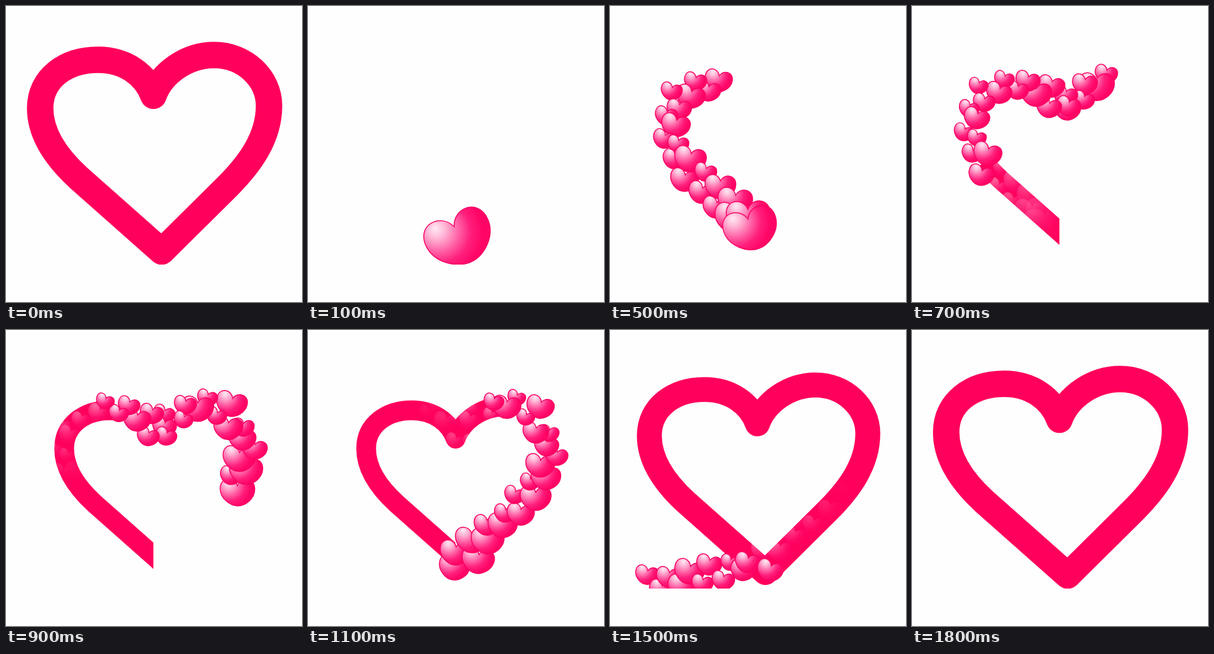
An HTML page with a canvas for the animation above (1.9 s loop, 498 px wide and 498 px high).

```html
<!DOCTYPE html>
<html lang="en">
<head>
<meta charset="utf-8">
<title>Heart trail</title>
<style>
  html, body { margin: 0; width: 100%; height: 100%; overflow: hidden; background: #fdfefd; }
  canvas { display: block; }
</style>
</head>
<body>
<canvas id="stage" width="498" height="498"></canvas>
<script>
const ctx = document.getElementById('stage').getContext('2d');
const LOOP = 1900, STEP = 100, FLOOR = 435;
const BEGIN = 100, END = 1300;          // hearts are emitted in this span
const SOLID = 450, GONE = 650;          // ages at which a heart melts and ends
const COUNT = 60, PINK = '#ff005c';
const SMALL = { x: 52.4, y: 63.6, scale: .79 };

const outline = 'M262 413L122 289C85 255 57.5 215 57.5 172C57.5 122 100 90.5 155 90.5' +
  'C200 90.5 235 115 248 151C262 112 305 82.5 350 82.5' +
  'C402 82.5 442.5 122 442.5 168C442.5 222 410 266 372 304L262 413';
const band = new Path2D(outline);
const ring = new Path2D(outline + 'Z');

// The emitter follows the outline, then runs off to the lower left
const guide = document.createElementNS('http://www.w3.org/2000/svg', 'path');
guide.setAttribute('d', outline + 'L10 466');
const length = guide.getTotalLength();
const headAt = t => Math.max(0, t - BEGIN) / (END - BEGIN) * length;

function guidePoint(d) {
  const p = guide.getPointAtLength(d);
  return { x: SMALL.x + p.x * SMALL.scale, y: SMALL.y + p.y * SMALL.scale };
}

let seed = 7;
const random = () => (seed = seed * 16807 % 2147483647) / 2147483647;

const sparks = Array.from({ length: COUNT }, (_, i) => {
  const born = BEGIN + (END - BEGIN) * i / COUNT;
  const d = headAt(born);
  const a = guidePoint(Math.max(0, d - 4)), b = guidePoint(d + 4);
  const turn = Math.atan2(b.y - a.y, b.x - a.x);
  const side = (i % 2 ? 1 : -1) * (4 + 15 * random());
  const width = 37 + 24 * random() ** 1.5 + 55 * Math.exp(-i / 3);
  return {
    born, width,
    x: (a.x + b.x) / 2 - Math.sin(turn) * side,
    y: (a.y + b.y) / 2 + Math.cos(turn) * side,
    vx: .06 * Math.cos(turn), vy: .06 * Math.sin(turn),
    tilt: 16 - (width - 36) * .5 + 12 * (random() - .5)
  };
}).reverse();

const heart = new Path2D('M.03 .38C-.18 .4 -.5 .18 -.5 -.12C-.5 -.46 -.1 -.48 0 -.2' +
  'C.1 -.46 .5 -.44 .5 -.1C.5 .18 .22 .38 .03 .38Z');
const shade = ctx.createRadialGradient(-.27, -.3, 0, -.22, -.2, .62);
[[0, '#ffeaf4'], [.2, '#ffbcd9'], [.5, '#ff62a6'], [.75, '#ff1f7c'], [1, '#ff0566']]
  .forEach(([at, color]) => shade.addColorStop(at, color));

function drawSpark(s, age) {
  const size = s.width * Math.exp(-age / 1800);
  ctx.save();
  ctx.translate(s.x + s.vx * age, s.y + s.vy * age);
  ctx.rotate((s.tilt + age * .02) * Math.PI / 180);
  ctx.scale(size, size);
  ctx.fillStyle = shade;
  ctx.fill(heart);
  ctx.lineWidth = 1.5 / size;
  ctx.strokeStyle = '#f80062';
  ctx.stroke(heart);
  ctx.restore();
}

function drawBand(t) {
  const tracing = t >= BEGIN && t < END;
  const left = Math.min(1, Math.max(0, 1 - (t - END) / 500));
  const rest = t < BEGIN ? 0 : left ** 3;
  const scale = 1 - (1 - SMALL.scale) * rest;
  const shown = headAt(t - 400);
  if (tracing && !shown) return;
  ctx.save();
  ctx.translate(SMALL.x * rest, SMALL.y * rest);
  ctx.scale(scale, scale);
  ctx.lineWidth = 44.5 - 2.5 * rest;
  ctx.lineJoin = 'round';
  ctx.strokeStyle = PINK;
  if (tracing) ctx.setLineDash([shown, length * 2]);
  ctx.stroke(tracing ? band : ring);
  ctx.restore();
  // The open end is cut upright
  if (tracing) ctx.clearRect(248, 330, 40, 110);
}

function draw(t) {
  ctx.clearRect(0, 0, 498, 498);
  ctx.save();
  ctx.beginPath();
  ctx.rect(0, 0, 498, FLOOR);
  ctx.clip();
  drawBand(t);

  // Old hearts melt into the band, young ones lie on top
  ctx.globalCompositeOperation = 'source-atop';
  for (const s of sparks) {
    const age = t - s.born;
    if (age < SOLID || age >= GONE) continue;
    ctx.globalAlpha = .5 * (GONE - age) / (GONE - SOLID);
    drawSpark(s, age);
  }
  ctx.globalCompositeOperation = 'source-over';
  ctx.globalAlpha = 1;
  for (const s of sparks) {
    const age = t - s.born;
    if (age >= 0 && age < SOLID) drawSpark(s, age);
  }
  ctx.restore();
}

const start = performance.now();
function tick() {
  const t = (performance.now() - start) % LOOP;
  draw(Math.floor(t / STEP) * STEP);
  requestAnimationFrame(tick);
}
tick();
</script>
</body>
</html>
```
